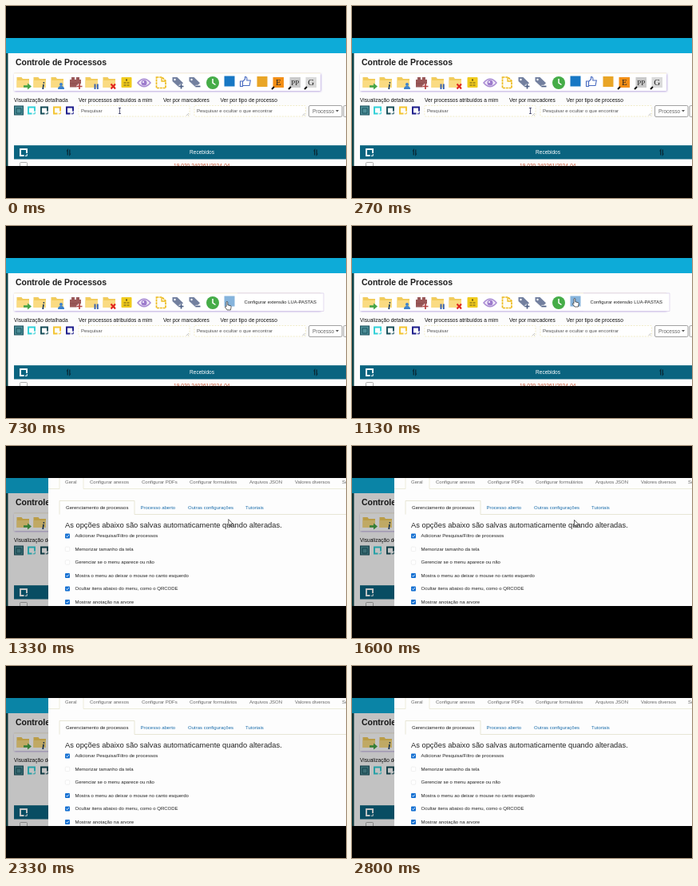
Write an HTML page that moves like this. It is 426x240 px and loops after 2.87 s.

```html
<!DOCTYPE html>
<html lang="pt-BR">
<head>
<meta charset="utf-8">
<title>Controle de Processos</title>
<style>
html, body { margin: 0; width: 100%; height: 100%; overflow: hidden; background: #000; }
svg { display: block; width: 426px; height: 240px; font-family: "Liberation Sans", Arial, sans-serif; }
text { white-space: pre; }
</style>
</head>
<body>
<svg id="stage" viewBox="0 0 426 240">
  <defs>
    <clipPath id="band"><rect y="40" width="426" height="160"/></clipPath>
    <filter id="glow" x="-5%" y="-30%" width="110%" height="170%">
      <feDropShadow dx="0.6" dy="0.8" stdDeviation="0.8" flood-color="#8a6ccb" flood-opacity=".65"/>
    </filter>
    <g id="folder">
      <path d="M-8.500-7h6l1.500 2h8v11h-15.500z" fill="#f2cc5c"/>
      <path d="M-8.500-3h15.500v9h-15.500z" fill="#fadb82"/>
    </g>
    <path id="tag" d="M-7.500-7h6l7.500 7.200-5.300 5.300-8.200-7.500z" fill="#73809f"/>
    <g id="open" fill="none" stroke-width="1.900">
      <path d="M.5 4h-4.500v-8h8v5"/>
      <path d="M1.800 4.300h2.500v-2.300" stroke-width="1"/>
    </g>
    <g id="sort" fill="none" stroke="#082530" stroke-width="1.200">
      <path d="M-1.300 3.500v-6.500l-1 1.500M1.300-3.500v6.500l1-1.500"/>
    </g>
  </defs>
  <g clip-path="url(#band)">
    <g id="page"></g>
    <g id="modal"></g>
    <g id="pointer">
      <path data-kind="beam" d="M-1.500-3.500h3M0-3.500v7M-1.500 3.500h3" fill="none" stroke="#33345c" stroke-width=".8"/>
      <path data-kind="arrow" d="M0 0v8l1.900-1.800 1.300 3 1.200-.5-1.300-2.900h2.600z" fill="#fff" stroke="#222" stroke-width=".7"/>
      <path data-kind="hand" d="M-1 5.500v-5q0-1 .9-1t.9 1v3.300l3.500.9q1 .3.800 1.500l-.7 3.800h-4.400l-2.700-3.800q.7-1.200 1.700-.2z" fill="#fff" stroke="#222" stroke-width=".7"/>
    </g>
  </g>
</svg>
<script>
const LOOP = 2870, STEP = 66.67;
const HOVER_AT = 600, MODAL_AT = 1330, POINTER_END = 1930;
const $ = id => document.getElementById(id);

const rect = (x, y, w, h, fill, extra = '') =>
  `<rect x="${x}" y="${y}" width="${w}" height="${h}" fill="${fill}" ${extra}/>`;
const text = (x, y, str, size = 6, fill = '#222', extra = '') =>
  `<text x="${x}" y="${y}" font-size="${size}" fill="${fill}" ${extra}>${str}</text>`;
const path = (d, stroke, width = 1, fill = 'none') =>
  `<path d="${d}" stroke="${stroke}" stroke-width="${width}" fill="${fill}"/>`;
const use = (id, x, y, extra = '') => `<use href="#${id}" x="${x}" y="${y}" ${extra}/>`;
const at = (x, y, body) => `<g transform="translate(${x} ${y})">${body}</g>`;

const folder = badge => use('folder', 0, 0) + badge;
const outlined = (d, color) => path(d, '#fff', 3.400) + path(d, color, 1.700);
const tag = sign => use('tag', 0, 0) +
  '<circle cx="-4.500" cy="-4" r="1.200" fill="#fff"/>' + outlined(sign, '#4d5f85');
const letter = (str, fill, size) =>
  rect(-6.500, -7, 13.500, 13, fill) +
  text(0.300, 3.300, str, size, '#222', 'text-anchor="middle" font-family="Liberation Serif, serif"') +
  path('M-5 5l-3 3', '#111', 1.900);

const icons = [
  [22, folder(path('M0 4.500h6', '#45a447', 2.600) + path('M5 .5l5 4-5 4z', 'none', 0, '#45a447'))],
  [43, folder(text(2, 8, 'i', 12, '#17395c', 'font-weight="bold" font-style="italic" font-family="Liberation Serif, serif"'))],
  [65, folder('<circle cx="4" cy="2" r="2" fill="#3c82cc"/>' + path('M0 8q0-4 4-4t4 4z', 'none', 0, '#3c82cc'))],
  [87, path('M-7-4h2v-3h4v3h2v-3h4v3h2v9.500h-14z', 'none', 0, '#9a5858') +
       path('M-7 1h13', '#85484c', .7) + outlined('M5 1v7M1.500 4.500h7', '#b34242')],
  [108, folder(path('M3.500 1.500v6.500M6.800 1.500v6.500', '#365fae', 1.900))],
  [130, folder(path('M1.500 1.500l5.500 6M7 1.500l-5.500 6', '#e0241f', 2))],
  [151, rect(-6.500, -7, 13, 13, '#f0cb1e', 'rx="1"') + path('M-3.500 0h3M.5 0h3M-3.500 3h3M.5 3h3', '#6b5a14', 1) + rect(-1, -4.500, 2, 2, '#6b5a14')],
  [173, path('M-8 0q8-9.500 16 0q-8 9.500-16 0z', '#a98bd3', 1.500, '#f0e9f8') +
        '<circle r="3.500" fill="#9d7ccc"/><circle cx="-1" cy="-1" r="1.100" fill="#fff"/>'],
  [194, `<path d="M-5.500-7h7l4.500 4.500v9h-11.500z" fill="#fffdf4" stroke="#edbb1f" stroke-width="1.700" stroke-dasharray="3 .8"/>` +
        path('M1-7v5h5', '#edbb1f', 1.300)],
  [216, tag('M3.500 1.500v6M.5 4.500h6')],
  [237, tag('M.5 4.500h6')],
  [259, '<circle r="8" fill="#46ad48"/>' + path('M0-5v5l3.500 2.500', '#fff', 1.500)]
];
const tail = [
  [300, path('M-6.500-2h3v6.500h-3zM-3.500-1.500l3-3v-3q3-.3 2.300 4.500h4.500l-1.300 6.500h-8.500', '#4a6cc0', 1.100)],
  [321, rect(-6.500, -8, 13, 13, '#e9a526')],
  [341, letter('E', '#f38f16', 11)],
  [362, letter('PP', '#cacaca', 9)],
  [382, letter('G', '#dadada', 11)]
];
const place = list => list.map(([x, body]) => at(x, 96, body)).join('');

const field = (x, w, hint) =>
  rect(x, 124.500, w, 13.500, '#fff', 'stroke="#ece6b4" stroke-width=".7" stroke-dasharray="2 1.500" rx="1"') +
  text(x + 3, 133.200, hint, 6, '#555') +
  path(`M${x + w - 4} 137l3-3M${x + w - 2} 137l1-1`, '#888', .5);
const button = (x, w) => rect(x, 124.500, w, 14, '#fff', 'stroke="#8b8b8b" stroke-width=".8" rx="1.500"');

$('page').innerHTML =
  rect(0, 40, 426, 160, '#fcfcfc') +
  rect(0, 40, 426, 19, '#0dabd8') +
  rect(0, 59, 2.500, 141, '#0b4247') +
  text(12, 74, 'Controle de Processos', 10.470, '#1c1c1c', 'font-weight="bold"') +
  rect(10, 84, 384, 22, '#fff', 'filter="url(#glow)" rx="1"') +
  path('M10 84h384', '#f3ebc4', .7) +
  place(icons) +
  `<rect id="ext" x="273.500" y="87.500" width="13" height="13" fill="#1878c4"/>` +
  `<g id="tail">${place(tail)}</g>` +
  `<g id="tip">${rect(290, 84.500, 108, 21.500, '#fff') + path('M290 84h108v22.500h-108', '#d8cdea', .7) +
    text(298.500, 97.200, 'Configurar extensão LUA-PASTAS', 5.900)}</g>` +
  [[10, 'Visualização detalhada'], [91, 'Ver processos atribuídos a mim'],
   [197, 'Ver por marcadores'], [268.500, 'Ver por tipo de processo']]
    .map(([x, str]) => text(x, 120.300, str, 6.580, '#111')).join('') +
  rect(10.500, 125, 11, 11, '#4d8d97', 'stroke="#174e5a" stroke-width="1"') +
  path('M13 128h6v6h-6z', '#174e5a', .9) +
  ['#2fd0d8', '#174e59', '#f3c431', '#1b1b8a']
    .map((c, i) => use('open', 32 + 16 * i, 130.500, `stroke="${c}"`)).join('') +
  field(91, 139, 'Pesquisar') +
  field(236, 139.500, 'Pesquisar e ocultar o que encontrar') +
  button(379.500, 41.500) + text(384, 133.700, 'Processo', 6.500, '#666') +
  path('M413 130h4l-2 2.400z', 'none', 0, '#555') + button(423, 10) +
  rect(10, 174, 416, 17.500, '#0a6480') + rect(10, 174, 416, 1, '#347f93') +
  use('open', 22, 183, 'stroke="#fff"') + use('sort', 78.500, 183) + use('sort', 388, 183) +
  text(245.500, 185.200, 'Recebidos', 6.550, '#fff', 'text-anchor="middle"') +
  rect(17.500, 195.500, 9, 9, '#fff', 'stroke="#999" stroke-width=".8" rx="1"') +
  text(210, 201.800, '19.020.240261/2024-04', 6.650, '#c4502f');

const options = [
  ['Adicionar Pesquisa/Filtro de processos', 1],
  ['Memorizar tamanho da tela', 0],
  ['Gerenciar se o menu aparece ou não', 0],
  ['Mostra o menu ao deixar o mouse no canto esquerdo', 1],
  ['Ocultar itens abaixo do menu, como o QRCODE', 1],
  ['Mostrar anotação na arvore', 1]
];
const option = ([label, on], i) => {
  const y = 112.400 + 16.500 * i;
  const box = on
    ? rect(74, y - 3, 6, 6, '#1470d2', 'rx="1"') + path(`M75.400 ${y}l1.200 1.300 2.200-2.600`, '#fff', .9)
    : rect(74.300, y - 2.700, 5.400, 5.400, '#fff', 'stroke="#e6e6e6" stroke-width=".6" rx="1"');
  return box + text(86.500, y + 2, label);
};
const tabs = (y, fill, list) => list.map(([x, str]) => text(x, y, str, 6, fill)).join('');

$('modal').innerHTML =
  rect(0, 40, 53, 160, '#000', 'opacity=".23"') +
  rect(53, 40, 373, 160, '#fdfdfd') +
  path('M53 53.500h14M97 53.500h329M67 40v13.500M97 40v13.500', '#e9e7d2', .8) +
  tabs(46.700, '#666', [[74, 'Geral'], [105, 'Configurar anexos'], [170, 'Configurar PDFs'],
    [230, 'Configurar formulários'], [305, 'Arquivos JSON'], [362, 'Valores diversos'], [421, 'Sobre']]) +
  path('M67 85.500v-17h94v17h265', '#e3e1cc', .8) +
  tabs(79, '#222', [[75, 'Gerenciamento de processos']]) +
  tabs(79, '#1b6dab', [[168.500, 'Processo aberto'], [228, 'Outras configurações'], [300, 'Tutoriais']]) +
  text(74, 102, 'As opções abaixo são salvas automaticamente quando alteradas.', 9.340) +
  options.map(option).join('');

// Pointer path: time, x, y
const route = [
  [0, 142.500, 131], [270, 224.500, 131], [400, 252, 118], [600, 277, 95],
  [730, 277, 95], [1130, 279, 91], [1600, 278.500, 92.500], [LOOP, 278.500, 92.500]
];
const kinds = [...$('pointer').children];
const show = (el, on) => el.setAttribute('visibility', on ? 'visible' : 'hidden');

function locate(t) {
  const i = route.findIndex((p, n) => n && t <= p[0]);
  const [t0, x0, y0] = route[i - 1], [t1, x1, y1] = route[i];
  const k = (t - t0) / (t1 - t0);
  return [x0 + (x1 - x0) * k, y0 + (y1 - y0) * k];
}

function draw(t) {
  const hover = t >= HOVER_AT && t < MODAL_AT;
  const modal = t >= MODAL_AT;
  const [x, y] = locate(t);
  const kind = hover ? 'hand' : !modal && y > 124 ? 'beam' : 'arrow';
  show($('tip'), hover);
  show($('tail'), !hover);
  show($('modal'), modal);
  $('ext').setAttribute('fill', hover ? '#86b4dc' : '#1878c4');
  $('pointer').setAttribute('transform', `translate(${x} ${y})`);
  for (const el of kinds) show(el, el.dataset.kind === kind && t < POINTER_END);
}

const start = performance.now();
function tick() {
  const t = (performance.now() - start) % LOOP;
  draw(Math.min(42, Math.floor((t + 3.400) / STEP)) * STEP);
  requestAnimationFrame(tick);
}
tick();
</script>
</body>
</html>
```
